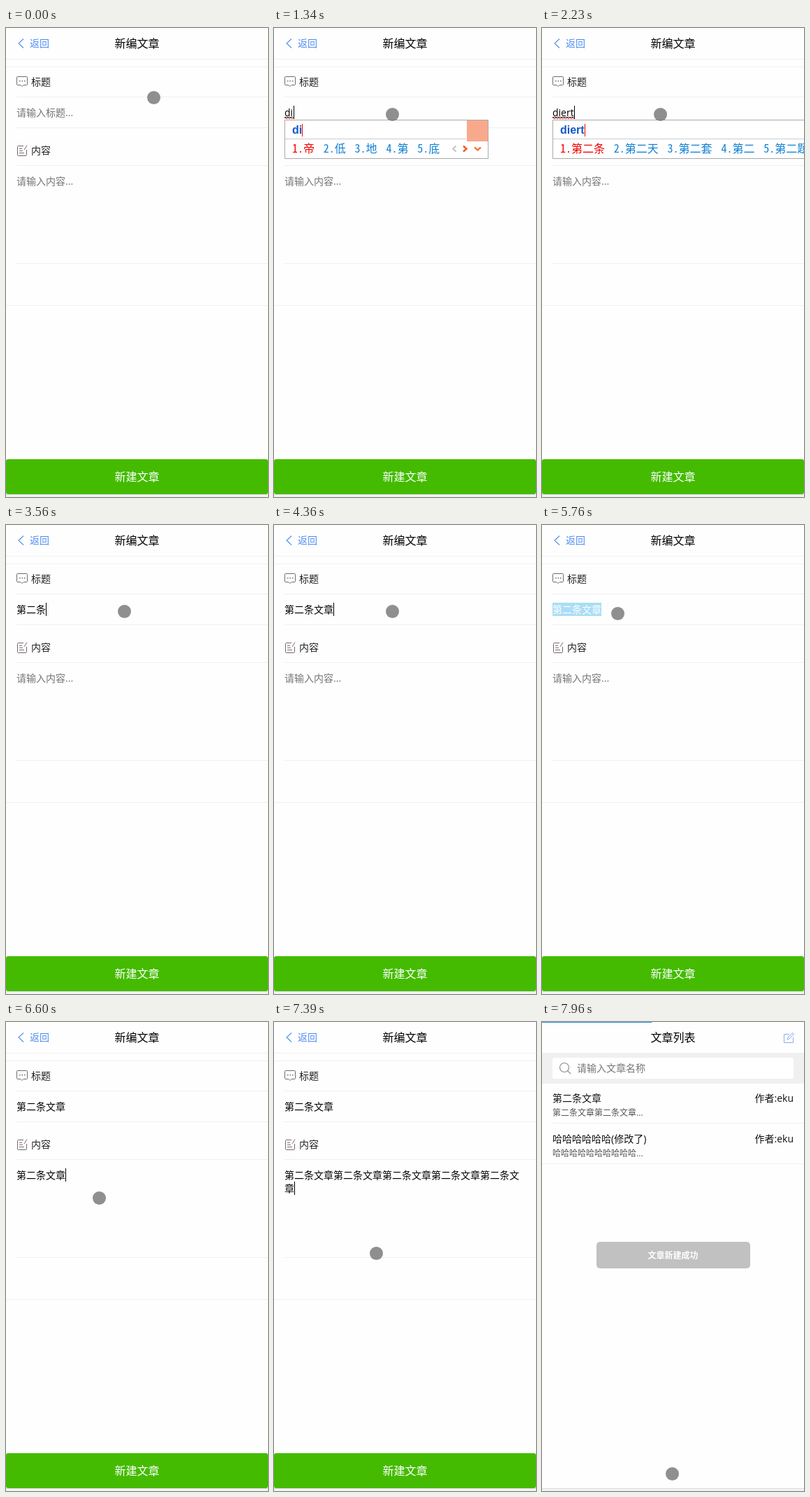
Animation of 375 by 670 pixels, one loop 8 s. Source, as an HTML page with a canvas:

```html
<!DOCTYPE html>
<html lang="zh-CN">
<head>
<meta charset="utf-8">
<title>新编文章</title>
<style>
html, body { margin: 0; width: 100%; height: 100%; overflow: hidden; background: #fefefe; }
canvas { display: block; width: 375px; height: 670px; }
</style>
</head>
<body>
<canvas id="stage"></canvas>
<script>
const LOOP = 8000, W = 375, H = 670;
const SANS = '"Open Sans", "Noto Sans CJK SC", "Noto Sans CJK", sans-serif';
const MONO = '"Noto Sans Mono CJK SC", "Liberation Mono", monospace';
const LINE = '#f0f0f0', HINT = '#757575', BLUE = '#4f8df3', ICON = '#6c6c6c';
const PHRASE = '第二条文章';

const canvas = document.getElementById('stage');
const ctx = canvas.getContext('2d');
const dpr = window.devicePixelRatio || 1;
canvas.width = W * dpr;
canvas.height = H * dpr;

// Every track is a list of [start, ...values]; each value holds until the next.
const pointer = [
  [0, 211, 99], [120, 203, 103], [260, 188, 112], [400, 173, 121], [540, 169, 123],
  [4960, 167, 178], [5090, 165, 271], [5230, 146, 222], [5360, 120, 150], [5490, 108, 126],
  [5910, 118, 160], [6040, 150, 250], [6180, 176, 341], [6320, 148, 280], [6460, 133, 251],
  [7260, 146, 330], [7400, 168, 460], [7540, 182, 580], [7670, 187, 647], [7810, 186, 645]
];
const typing = [
  [0, ''],
  [1205, '', 'd', '的 但是 都是 大家 第二个'],
  [1340, '', 'di', '帝 低 地 第 底'],
  [1650, '', 'die', '第二 爹 跌 第二天 第二个'],
  [1800, '', 'dier', '第二 第二天 第二个 第二季 第二次'],
  [2230, '', 'diert', '第二条 第二天 第二套 第二 第二题'],
  [2630, '第二条'],
  [3930, '第二条', 'w', '我 为 无 完 问'],
  [4073, '第二条', 'wen', '问 文 稳 闻 温'],
  [4217, '第二条', 'wenzh', '文章 问着 文中 温州 闻着'],
  [4360, PHRASE]
];
const caret = [
  [0, false], [540, true], [1070, false], [1205, true], [3060, false], [3560, true],
  [4830, false], [5360, true], [5760, false], [6320, true]
];
const pastes = [[0, 0], [6600, 1], [6720, 2], [6840, 3], [6980, 4], [7120, 5]];
const SELECT = 5760, FOCUS_BODY = 6320, SAVED = 7960;

function at(track, t) {
  let hit = track[0];
  for (const key of track) if (key[0] <= t) hit = key;
  return hit.slice(1);
}

function rect(x, y, w, h, color, r = 0) {
  ctx.fillStyle = color;
  ctx.beginPath();
  ctx.roundRect(x, y, w, h, r);
  ctx.fill();
}

function text(str, x, y, color = '#000', size = 14, align = 'left', font = SANS, weight = '400') {
  ctx.font = `${weight} ${size}px ${font}`;
  ctx.textAlign = align;
  ctx.fillStyle = color;
  ctx.fillText(str, x, y);
  return ctx.measureText(str).width;
}

function stroke(d, color, width = 1) {
  ctx.strokeStyle = color;
  ctx.lineWidth = width;
  ctx.stroke(new Path2D(d));
}

function disc(x, y, r, color) {
  ctx.fillStyle = color;
  ctx.beginPath();
  ctx.arc(x, y, r, 0, Math.PI * 2);
  ctx.fill();
}

const rule = (x, y) => rect(x, y, W - x, 1, LINE);

function drawForm() {
  stroke('M25 15.5L18 22L25 28.5', BLUE, 1.1);
  text('返回', 34, 27, BLUE);
  text('新编文章', 187.5, 28, '#000', 16, 'center');
  rule(0, 44);
  rule(0, 55);

  stroke('M16.5 69.5H29.5Q30.5 69.5 30.5 70.5V80.5Q30.5 81.5 29.5 81.5H25L23 83.5L21 81.5H16.5Q15.5 81.5 15.5 80.5V70.5Q15.5 69.5 16.5 69.5Z', ICON);
  for (let i = 0; i < 3; i++) rect(19 + i * 3.5, 75, 1.5, 1.5, ICON);
  text('标题', 36, 82, '#222');
  rule(15, 98);
  rule(15, 142);

  stroke('M25 168.5H17.5Q16.5 168.5 16.5 169.5V181.5Q16.5 182.5 17.5 182.5H28.5Q29.5 182.5 29.5 181.5V174', ICON);
  stroke('M30 167.5L26 174M19 172.5H23M19 175.5H24M19 178.5H26', '#866');
  text('内容', 36, 180, '#222');
  rule(15, 196);
  rule(15, 336);
  rule(0, 396);

  rect(0, 616, W, 50, '#44bb00', 3);
  text('新建文章', 187.5, 647, '#fff', 16, 'center');
}

function drawCaret(x, y) {
  rect(Math.round(x), y, 1, 19, '#000');
}

function drawIme(x, pinyin, words) {
  // Candidates are laid out first so the panel can fit them.
  let cx = x + 11;
  const items = words.split(' ').map((word, i) => {
    const item = { word, i, x: cx };
    cx += 16 + word.length * 16 + 12.8;
    return item;
  });
  const right = Math.round(cx - 12.8 + 70);
  rect(x, 131, right - x, 56, '#aaa');
  rect(x + 1, 132, right - x - 2, 54, '#fff');
  rect(x + 1, 158, right - x - 33, 1, '#ccc');

  const w = text(pinyin, x + 11, 151, '#1457c4', 16, 'left', '"Liberation Sans", sans-serif', '700');
  rect(Math.round(x + 11 + w), 137, 1, 18, '#f00');
  for (const { word, i, x: ix } of items) {
    const color = i ? '#0f80d2' : '#f00000';
    text(`${i + 1}.`, ix, 178, color, 16, 'left', MONO);
    text(word, ix + 16, 178, color, 16, 'left', SANS, '300');
  }
  ctx.save();
  ctx.translate(right, 0);
  stroke('M-46.5 168.5L-51 172.5L-46.5 176.5', '#c4c4c4', 2);
  stroke('M-36 168.5L-31.5 172.5L-36 176.5', '#f25a2c', 2.4);
  stroke('M-20 170.5L-15.5 174.5L-11 170.5', '#f47a3c', 2.4);
  rect(-31, 132, 30, 30, '#f9a98b');
  ctx.restore();
}

function drawTitleField(t) {
  const [done, pinyin, words] = at(typing, t);
  const selected = t >= SELECT && t < FOCUS_BODY;
  const on = at(caret, t)[0] && t < FOCUS_BODY;
  if (!done && !pinyin) {
    text('请输入标题...', 15, 126, HINT);
    if (on) drawCaret(15, 111);
    return;
  }
  if (selected) rect(15, 111, 70, 19, '#abdef4');
  let x = 15 + text(done, 15, 126, selected ? '#fff' : '#000');
  const start = x;
  if (pinyin) {
    x += text(pinyin, x, 126);
    rect(start, 127, x - start, 1, '#333');
    for (let sx = start; sx < x; sx += 2) rect(sx, 128 + (sx - start) / 2 % 2, 2, 1, '#e03030');
  }
  if (on) drawCaret(x + (pinyin ? 0.6 : 0), 111);
  if (pinyin) drawIme(done ? 57 : 15, pinyin, words);
}

function drawBodyField(t) {
  const body = PHRASE.repeat(at(pastes, t)[0]);
  const perLine = 24;
  if (!body) text('请输入内容...', 15, 224, HINT);
  for (let i = 0; i * perLine < body.length; i++)
    text(body.slice(i * perLine, (i + 1) * perLine), 15, 224 + i * 19);
  if (t >= FOCUS_BODY && at(caret, t)[0]) {
    const row = Math.floor(body.length / (perLine + 1));
    drawCaret(15 + (body.length - row * perLine) * 14, 209 + row * 19);
  }
}

function drawEntry(y, title, summary) {
  text(title, 15, y, '#111');
  text('作者:eku', 360, y, '#111', 14, 'right');
  text(summary, 15, y + 19.5, '#555', 12);
}

function drawList() {
  rect(0, 0, 157, 1, '#2299dd');
  text('文章列表', 187.5, 28, '#000', 16, 'center');
  stroke('M354 17.5H346.5V29.5H359.5V22M351 25L352 22L359 15.5L360.5 17L354 24Z', '#8fa9f3');

  rect(0, 44, W, 44, '#f0f0f1');
  rect(15, 51, 345, 30, '#fff', 3);
  stroke('M38.5 65A6.5 6.5 0 1 1 25.5 65A6.5 6.5 0 1 1 38.5 65M36.8 69.8L41 74', '#888', 1.1);
  text('请输入文章名称', 50, 71, HINT);

  drawEntry(114, PHRASE, PHRASE.repeat(2) + '...');
  rule(15, 144);
  drawEntry(172, '哈哈哈哈哈哈(修改了)', '哈'.repeat(10) + '...');
  rule(0, 202);

  rect(78, 314, 220, 38, '#c1c1c1', 5);
  text('文章新建成功', 187.5, 338, '#fff', 12, 'center', SANS, '700');
}

function drawBottomEdge() {
  rect(0, 666, W, 4, '#f3f3f3');
  rect(0, 666, W, 1, '#dcdcdc');
}

function draw(t) {
  ctx.setTransform(dpr, 0, 0, dpr, 0, 0);
  rect(0, 0, W, H, '#fefefe');
  if (t >= SAVED) {
    drawList();
  } else {
    drawForm();
    drawBodyField(t);
    drawTitleField(t);
  }
  drawBottomEdge();
  const [x, y] = at(pointer, t);
  disc(x + 0.5, y + 0.5, 9.5, 'rgba(112, 112, 112, 0.78)');
}

const begin = performance.now();
function tick() {
  draw((performance.now() - begin) % LOOP);
  requestAnimationFrame(tick);
}
tick();
</script>
</body>
</html>
```
